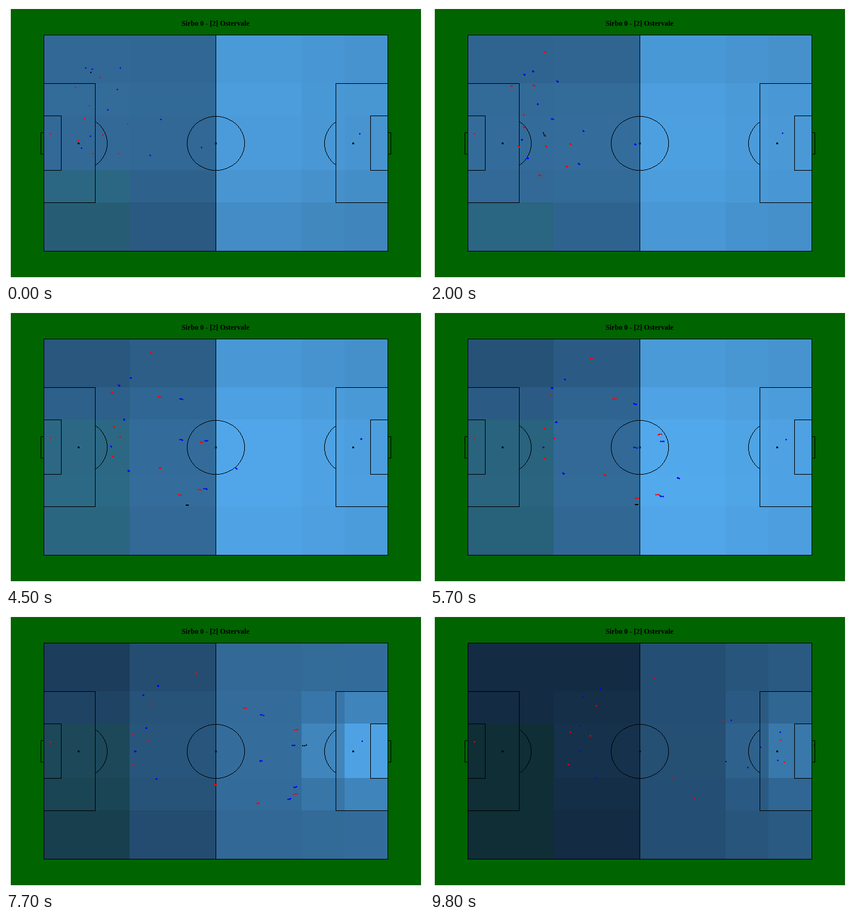
These frames come from a looping animation (700x461 px, 10000 ms). A matplotlib script:

```python
import numpy as np
import matplotlib.pyplot as plt
from matplotlib.animation import FuncAnimation

W, H, DPI = 700, 461, 64
STEP, FRAMES, END = 100, 100, 9800

WHITE, GREEN, BLACK = (255, 255, 255), (0, 100, 0), (0, 0, 0)
RED, BLUE = (255, 0, 0), (0, 0, 255)
LOW, HIGH = np.array([19, 43, 67]), np.array([86, 177, 247])
TEAL = np.array([-4, 3, -13])

LEFT, RIGHT, TOP, BOTTOM, MID_X, MID_Y = 63, 639, 48, 409, 351, 229
SPOTS = (121, 581)
X_EDGES = np.array([LEFT, 207, MID_X, 495, 567, RIGHT])
Y_EDGES = np.array([TOP, 129, 183, 274, 328, BOTTOM])
X_MID = (X_EDGES[1:] + X_EDGES[:-1])[:, None] / 2
Y_MID = (Y_EDGES[1:] + Y_EDGES[:-1])[None, :] / 2

# Key points are evenly spaced in time; a polynomial runs through them.
REDS = [
    [(74, 213)],
    [(157, 119), (217, 69), (289, 88), (375, 108)],
    [(116, 135), (155, 135), (217, 145), (278, 153)],
    [(142, 110), (211, 140), (346, 151), (491, 177)],
    [(139, 166), (184, 196), (235, 197)],
    [(131, 188), (196, 213), (268, 203)],
    [(121, 224), (183, 245), (231, 251)],
    [(162, 215), (224, 249), (317, 281), (405, 273)],
    [(203, 196), (276, 230), (426, 199), (587, 210)],
    [(188, 246), (272, 285), (423, 309), (593, 247)],
    [(145, 246), (233, 298), (382, 316), (443, 307)],
]
BLUES = [
    [(592, 213), (592, 213), (597, 215), (586, 197)],
    [(144, 105), (214, 114), (285, 124)],
    [(133, 103), (194, 127), (256, 138)],
    [(191, 103), (248, 138), (379, 162), (504, 177)],
    [(186, 139), (186, 175), (221, 189), (251, 186)],
    [(170, 173), (245, 202), (379, 237), (495, 246)],
    [(259, 189), (288, 215), (428, 219), (553, 222)],
    [(141, 217), (180, 228), (250, 228)],
    [(126, 237), (211, 270), (278, 273)],
    [(241, 249), (285, 281), (425, 314), (532, 256)],
    [(327, 236), (361, 245), (441, 288), (582, 244)],
]

# Time of each touch and where the ball is then.
TOUCHES = np.array([
    (0, 141, 110), (2000, 190, 214), (3400, 233, 256), (4400, 299, 325), (5700, 345, 324),
    (6650, 384, 319), (7650, 496, 219), (8900, 565, 208), (END, 643, 218),
])

PLUS = ((0, 0), (1, 0), (-1, 0), (0, 1), (0, -1))
BLOCK = ((0, 0), (1, 0), (0, 1), (1, 1))
RING = [(dx, dy) for dx in (-1, 0, 1) for dy in (-1, 0, 1) if dx or dy]


def fit(points):
    n = len(points)
    return np.polyfit(np.linspace(0, 1, n), points, n - 1)


def along(coeffs, t):
    return sum(c * (t / END) ** k for k, c in enumerate(coeffs[::-1]))


def ball_at(t):
    return [np.interp(t, TOUCHES[:, 0], TOUCHES[:, k]) for k in (1, 2)]


def zone_colors(t):
    """Each zone's value falls off around a focus that follows the ball."""
    bx, by = ball_at(t)
    fx, fy = 140 + .4 * bx, (by + MID_Y) / 2
    across, down = 3.2e-6 * (X_MID - fx) ** 2, 3.2e-6 * (Y_MID - fy) ** 2
    left = .51 - 2.4e-6 * (bx - 225) ** 2 - across - down

    # Past halfway the right side dims, except in front of the goal.
    q = np.clip((bx - MID_X) / (RIGHT - MID_X), 0, 1)
    mouth = np.exp(-((X_MID - 603) ** 2 + (Y_MID - MID_Y) ** 2) / 80 ** 2)
    right = (.79 + .00045 * min(bx, MID_X) - .68 * q ** .6 - down * (1 - q)
             + (.0007 * q - .0003) * (X_MID - 423)
             + .4 * np.sin(.8 * np.pi * np.sqrt(q)) * mouth)

    v = np.clip(np.where(X_MID < MID_X, left, right), 0, 1)
    rgb = LOW + (HIGH - LOW) * v[..., None]
    rgb[0, 2:][v[0, 2:] < .45] += TEAL
    return np.clip(rgb, 0, 255)


def stamp(img, pos, color, shape):
    x, y = (int(round(c)) for c in pos)
    for dx, dy in shape:
        img[y + dy, x + dx] = color


def box(mask, x0, y0, x1, y1):
    mask[[y0, y1], x0:x1 + 1] = True
    mask[y0:y1 + 1, [x0, x1]] = True


def ellipse(mask, cx, x0=0, x1=W, rx=48, ry=45):
    """One pixel wide ellipse, stepped along x where flat and along y where steep."""
    dx, dy = np.arange(-34, 35), np.arange(-31, 32)
    for s in (-1, 1):
        xs = np.r_[cx + dx, cx + s * rx * np.sqrt(1 - (dy / ry) ** 2)]
        ys = np.r_[MID_Y + s * ry * np.sqrt(1 - (dx / rx) ** 2), MID_Y + dy]
        keep = (xs >= x0) & (xs <= x1)
        mask[np.rint(ys[keep]).astype(int), np.rint(xs[keep]).astype(int)] = True


def pitch_lines():
    mask = np.zeros((H, W), bool)
    box(mask, LEFT, TOP, RIGHT, BOTTOM)
    for x0, x1, y0, y1 in ((LEFT, 149, 129, 328), (552, RIGHT, 129, 328),
                           (LEFT, 92, 183, 274), (610, RIGHT, 183, 274),
                           (58, LEFT, 211, 247), (RIGHT, 644, 211, 247)):
        box(mask, x0, y0, x1, y1)
    mask[TOP:BOTTOM, MID_X] = True
    ellipse(mask, MID_X)
    ellipse(mask, SPOTS[0], x0=149)
    ellipse(mask, SPOTS[1], x1=552)
    for x in SPOTS:
        stamp(mask, (x, MID_Y), True, RING + [(0, 0)])
    stamp(mask, (MID_X, MID_Y), True, RING)
    stamp(mask, (MID_X, MID_Y), False, [(0, 0)])
    return mask


lines = pitch_lines()
players = [(fit(p), color) for team, color in ((REDS, RED), (BLUES, BLUE)) for p in team]
canvas = np.full((H, W, 3), WHITE, np.uint8)
canvas[5:453, 8:695] = GREEN

fig = plt.figure(figsize=(W / DPI, H / DPI), dpi=DPI, facecolor="white")
ax = fig.add_axes([0, 0, 1, 1])
ax.axis("off")
picture = ax.imshow(canvas, interpolation="nearest", aspect="auto")
ax.text(350.5, 31.5, "Sirbo 0 - [2] Ostervale", family="Liberation Serif", weight="bold",
        size=12 * 72 / DPI, ha="center", va="baseline")


def draw(i):
    t = min(i * STEP, END)
    img = canvas.copy()
    for col, x0, x1 in zip(zone_colors(t), X_EDGES, X_EDGES[1:]):
        for color, y0, y1 in zip(col, Y_EDGES, Y_EDGES[1:]):
            img[y0:y1, x0:x1] = color
    img[lines] = BLACK

    # Three samples per step leave a short smear behind moving dots.
    trail = (t,) if t in (0, END) else (t - 50, t, t + 50)
    for s in trail:
        for path, color in players:
            stamp(img, along(path, s), color, PLUS)
    for s in trail:
        stamp(img, ball_at(s), BLACK, BLOCK)
    picture.set_data(img)
    return [picture]


anim = FuncAnimation(fig, draw, frames=FRAMES, interval=STEP, repeat=True, repeat_delay=0)
plt.show()
```
